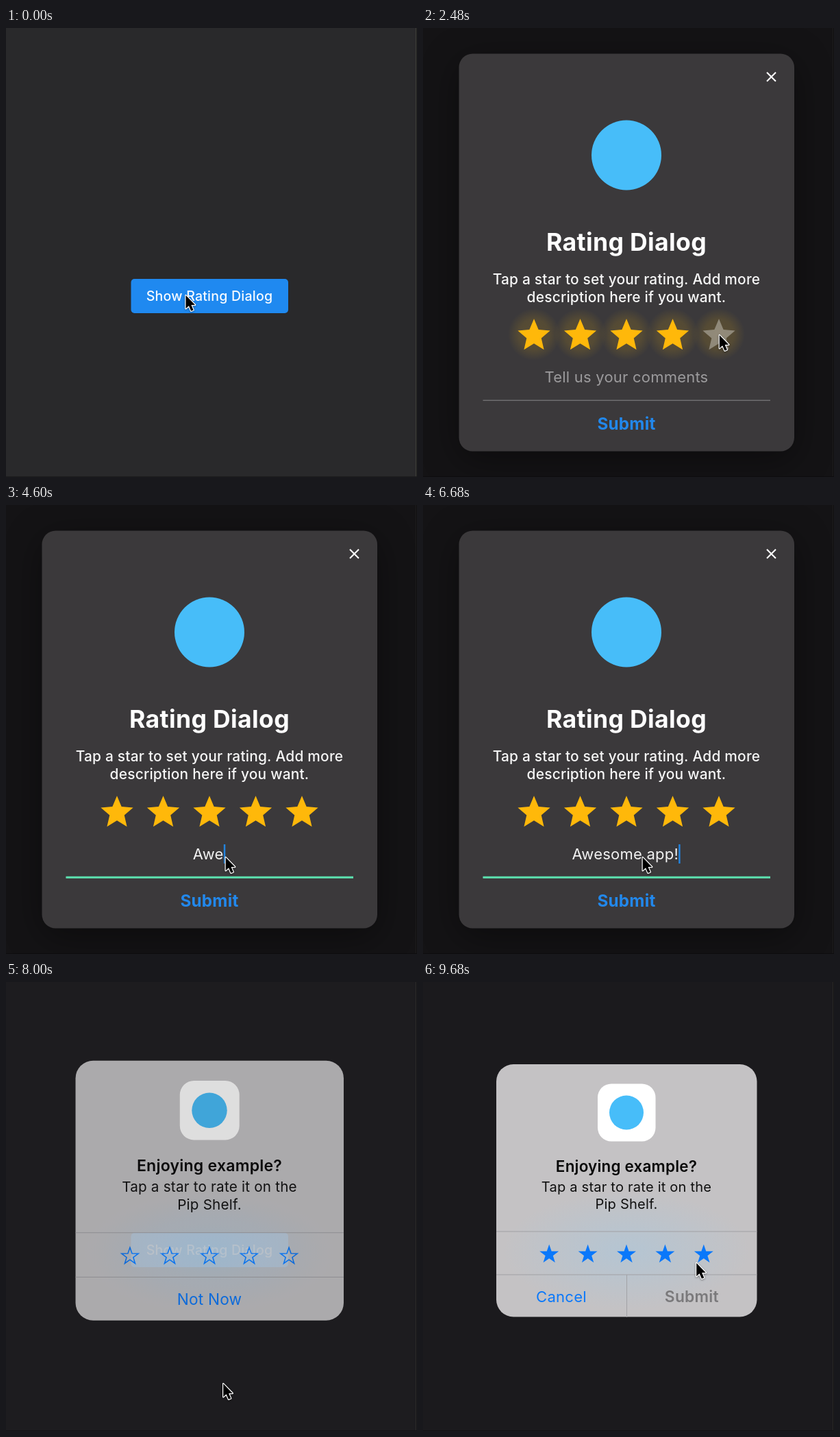
Animation of 600x655 px, one loop 9720 ms. Source, as an HTML page with a canvas:

```html
<!DOCTYPE html>
<html lang="en">
<head>
<meta charset="utf-8">
<title>Rating dialog</title>
<style>
  html, body { margin: 0; width: 100%; height: 100%; overflow: hidden; background: #29292b; }
  canvas { display: block; }
</style>
</head>
<body>
<canvas id="stage" width="600" height="655"></canvas>
<script>
const W = 600, H = 655, LOOP = 9720, CX = 297;
const stage = document.getElementById('stage').getContext('2d');
const buffer = document.createElement('canvas');
buffer.width = W;
buffer.height = H;
const layer = buffer.getContext('2d');
let g = stage;

const OPEN = 280, DRAG = 1500, RELEASE = 2900, FOCUS = 3760, SUBMIT = 7240, ALERT = 7760, RATE = 9240;
const COMMENT = 'Awesome app!';
const KEY_TIMES = [4160, 4360, 4540, 4800, 4960, 5120, 5280, 5440, 5600, 5760, 5920, 6240];

// Pointer stops: time, x, y
const POINTER = [
  [0, 262.5, 390], [480, 262.5, 390], [1200, 209.3, 454], [1420, 166, 455], [1500, 166, 455],
  [2480, 432.7, 448], [2620, 444, 449], [2980, 444, 449], [3560, 320.7, 514],
  [6740, 320.7, 514], [7100, 317.2, 586], [8240, 317.2, 586], [8960, 399.2, 410], [LOOP, 399.2, 410]
];

const clamp = v => Math.min(1, Math.max(0, v));
const progress = (t, start, length) => clamp((t - start) / length);
const easeOut = p => 1 - (1 - p) ** 2.1;
const smooth = p => p * p * (3 - 2 * p);

function rect(x, y, w, h, r, fill) {
  g.beginPath();
  g.roundRect(x, y, w, h, r);
  g.fillStyle = fill;
  g.fill();
}

function circle(x, y, r, fill) {
  g.beginPath();
  g.arc(x, y, r, 0, Math.PI * 2);
  g.fillStyle = fill;
  g.fill();
}

function text(str, x, y, size, weight, fill) {
  g.font = `${weight} ${size}px Inter, sans-serif`;
  g.letterSpacing = `${size * .01}px`;
  g.textAlign = 'center';
  g.fillStyle = fill;
  g.fillText(str, x, y);
}

// Draws a group off screen, then blends it in as one
function group(alpha, scale, cy, draw) {
  if (alpha <= 0) return;
  layer.clearRect(0, 0, W, H);
  g = layer;
  g.save();
  g.translate(CX, cy);
  g.scale(scale, scale);
  g.translate(-CX, -cy);
  draw();
  g.restore();
  g = stage;
  g.globalAlpha = alpha;
  g.drawImage(buffer, 0, 0);
  g.globalAlpha = 1;
}

function pointerAt(t) {
  const i = Math.max(1, POINTER.findIndex(p => p[0] > t));
  const [t0, x0, y0] = POINTER[i - 1], [t1, x1, y1] = POINTER[i];
  const dragging = t0 >= DRAG && t1 <= RELEASE;
  const p = progress(t, t0, t1 - t0), k = dragging ? p : smooth(p);
  return [x0 + (x1 - x0) * k, y0 + (y1 - y0) * k];
}

function drawPage() {
  g.fillStyle = '#29292b';
  g.fillRect(0, 0, W, H);
  g.fillStyle = '#40413c';
  g.fillRect(598, 0, 1, H);
  g.fillStyle = '#1c1c1d';
  g.fillRect(599, 0, 1, H);
  g.fillRect(0, 654, W, 1);
  rect(182.5, 366, 229.5, 50, 5, '#1f89f0');
  text('Show Rating Dialog', CX, 397.5, 19.6, 500, '#f8fbff');
}

function barrier(fill, alpha) {
  g.globalAlpha = alpha;
  g.fillStyle = fill;
  g.fillRect(0, 0, W, H);
  g.globalAlpha = 1;
}

const materialStar = new Path2D('M12 17.27L18.18 21l-1.64-7.03L22 9.24l-7.19-.61L12 2 9.19 8.63 2 9.24l5.46 4.73L5.82 21z');

function drawRating(t) {
  const dragX = t < DRAG ? 0 : pointerAt(Math.min(t, RELEASE))[0];
  const rating = Math.max(1, Math.min(5, Math.round((dragX - 129) / 67.6)));
  const glowing = t >= DRAG + 80 && t < RELEASE;
  for (let i = 0; i < 5; i++) {
    const x = 162 + i * 67.5;
    if (glowing) {
      const glow = g.createRadialGradient(x, 447, 0, x, 447, 38);
      glow.addColorStop(0, 'rgba(255,190,10,.16)');
      glow.addColorStop(.58, 'rgba(255,190,10,.13)');
      glow.addColorStop(1, 'rgba(255,190,10,0)');
      circle(x, 447, 38, glow);
    }
    g.save();
    g.translate(x - 12 * 2.36, 419.6);
    g.scale(2.36, 2.36);
    g.fillStyle = i < rating ? '#ffb80a' : 'rgba(255,255,255,.34)';
    g.fill(materialStar);
    g.restore();
  }
}

function drawComment(t) {
  const typed = COMMENT.slice(0, KEY_TIMES.filter(k => k <= t).length);
  const focus = progress(t, FOCUS, 160);
  if (typed) text(typed, 295.2, 517.2, 22, 400, '#f2f2f2');
  else text('Tell us your comments', CX, 517.2, 22, 400, '#9c9b9d');

  g.fillStyle = '#6f6e70';
  g.fillRect(87.5, 542.5, 419.5, 1.5);
  if (!focus) return;
  g.globalAlpha = focus;
  g.fillStyle = '#5ce2b0';
  g.fillRect(87.5, 541.7, 419.5, 3);
  g.globalAlpha = 1;

  const lastEdit = Math.max(FOCUS, ...KEY_TIMES.filter(k => k <= t));
  if ((t - lastEdit) % 1000 < 500) {
    const width = typed ? g.measureText(typed).width : 0;
    g.fillStyle = '#2383dd';
    g.fillRect(295.2 + width / 2 + .2, 495, 2.5, 28);
  }
}

function drawDialog(t) {
  g.save();
  g.shadowColor = 'rgba(0,0,0,.4)';
  g.shadowBlur = 54;
  g.shadowOffsetY = 12;
  rect(52.5, 37.5, 489.5, 580, 20, '#3b393b');
  g.restore();

  g.beginPath();
  g.moveTo(502, 64.8);
  g.lineTo(515, 77.8);
  g.moveTo(515, 64.8);
  g.lineTo(502, 77.8);
  g.lineWidth = 2.1;
  g.strokeStyle = '#fff';
  g.stroke();

  circle(CX, 185.5, 51, '#47bdf9');
  text('Rating Dialog', CX, 324.8, 35.6, 700, '#fff');
  text('Tap a star to set your rating. Add more', CX, 374.4, 20.9, 500, '#f6f6f6');
  text('description here if you want.', CX, 399.7, 20.9, 500, '#f6f6f6');
  drawRating(t);
  drawComment(t);
  text('Submit', CX, 585.5, 24.2, 700, '#2288ec');
}

function starPath(x, y, r) {
  g.beginPath();
  for (let i = 0; i < 10; i++) {
    const a = -Math.PI / 2 + i * Math.PI / 5, d = i % 2 ? r * .4 : r;
    g.lineTo(x + Math.cos(a) * d, y + Math.sin(a) * d);
  }
  g.closePath();
}

function drawAlert(t) {
  const rated = t >= RATE, blue = '#0a78fa';
  rect(107, 120, 380.5, 368.5, 25, '#c4c2c4');

  g.save();
  g.clip();
  g.translate(CX, 392);
  g.scale(1, .48);
  const tint = g.createRadialGradient(0, 0, 20, 0, 0, 180);
  tint.addColorStop(0, 'rgba(165,200,225,.45)');
  tint.addColorStop(1, 'rgba(165,200,225,0)');
  circle(0, 0, 180, tint);
  g.restore();

  rect(255, 148.5, 84.5, 84, 20, '#fff');
  circle(CX, 190.5, 25, '#47bdf9');
  text('Enjoying example?', CX, 276.5, 22.4, 600, '#080808');
  text('Tap a star to rate it on the', CX, 305.7, 20.1, 400, '#101010');
  text('Pip Shelf.', CX, 331.2, 20.1, 400, '#101010');

  g.fillStyle = '#a2a2a6';
  g.fillRect(107, 363.5, 380.5, 1);
  g.fillRect(107, 426.5, 380.5, 1);
  for (let i = 0; i < 5; i++) {
    starPath(184.2 + i * 56.4, 397.4, rated ? 14.7 : 12.5);
    g.fillStyle = g.strokeStyle = blue;
    g.lineWidth = 1.5;
    rated ? g.fill() : g.stroke();
  }
  if (rated) {
    g.fillStyle = '#a2a2a6';
    g.fillRect(297, 427, 1, 62);
    text('Cancel', 202, 466.5, 22.1, 400, blue);
    text('Submit', 392.3, 466.5, 22.8, 600, '#7a797b');
  } else {
    text('Not Now', CX, 466, 22, 400, blue);
  }
}

function drawPointer(t) {
  const [x, y] = pointerAt(t);
  g.save();
  g.translate(x, y);
  g.scale(.94, .94);
  g.beginPath();
  for (const [px, py] of [[0, 0], [0, 20.5], [4.7, 16.2], [8.2, 24.3], [11.8, 22.8], [8.4, 14.8], [14.4, 14.8]]) {
    g.lineTo(px, py);
  }
  g.closePath();
  g.lineJoin = 'round';
  g.lineWidth = 2.6;
  g.strokeStyle = '#fff';
  g.shadowColor = 'rgba(0,0,0,.4)';
  g.shadowBlur = 3;
  g.shadowOffsetY = 1;
  g.stroke();
  g.shadowColor = 'transparent';
  g.fillStyle = '#000';
  g.fill();
  g.restore();
}

function render(t) {
  drawPage();
  const shown = easeOut(progress(t, OPEN, 150)) * (1 - progress(t, SUBMIT, 150));
  barrier('#030002', .53 * shown);
  group(shown, 1, 327, () => drawDialog(t));

  const alert = easeOut(progress(t, ALERT, 400));
  barrier('#050007', .37 * alert);
  group(alert, 1.2 - .2 * alert, 304, () => drawAlert(t));
  drawPointer(t);
}

const begin = performance.now();
function tick() {
  render((performance.now() - begin) % LOOP);
  requestAnimationFrame(tick);
}
tick();
</script>
</body>
</html>
```
